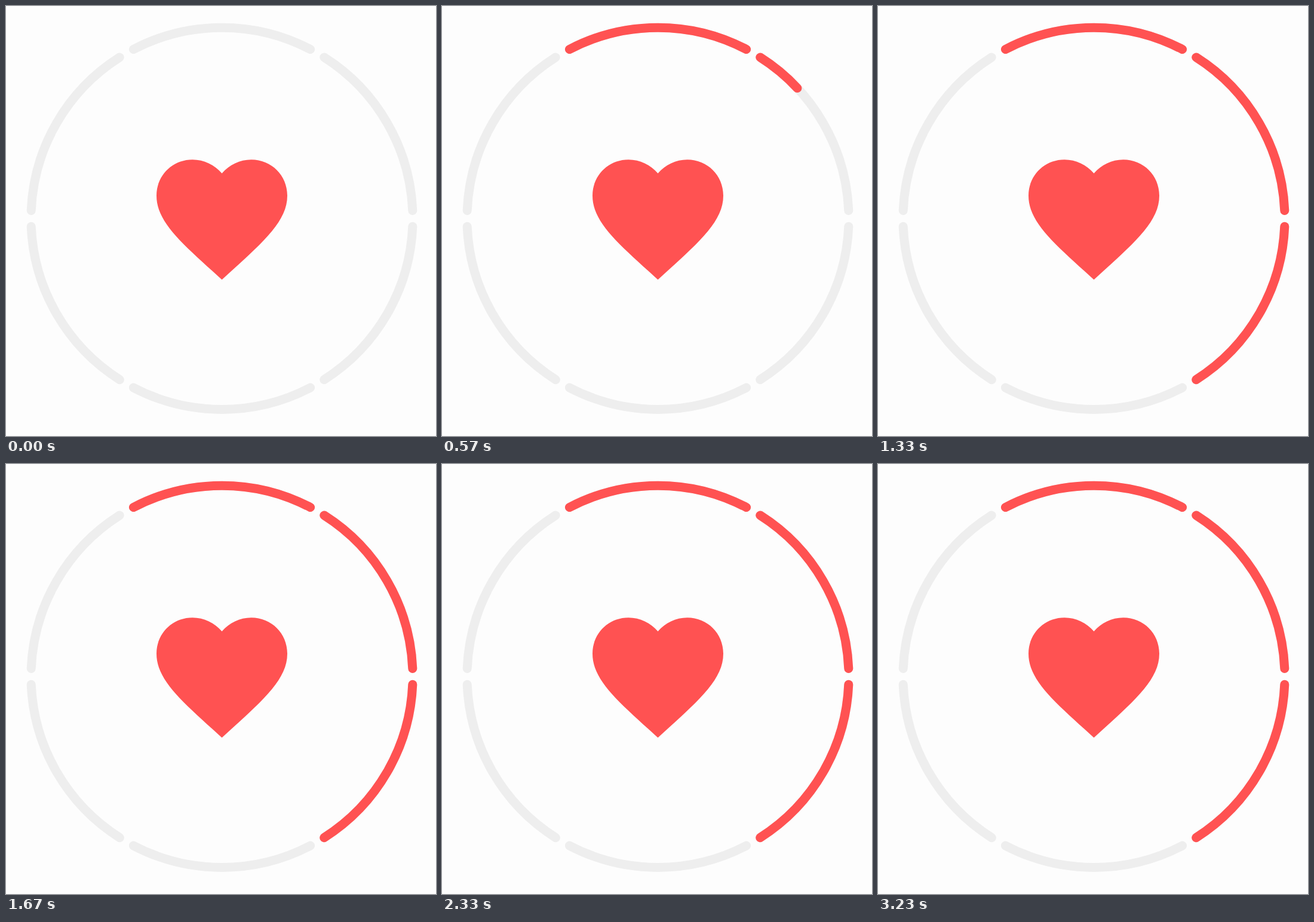
Write an HTML page that moves like this. It is 720 px wide and 720 px high and loops after 3.26 s.

```html
<!DOCTYPE html>
<html lang="en">
<head>
<meta charset="utf-8">
<title>Heart progress ring</title>
<style>
  html, body { margin: 0; width: 100%; height: 100%; overflow: hidden; background: #fdfdfd; }
  svg { display: block; width: 100%; height: 100%; }
  .arc { fill: none; stroke-width: 15; stroke-linecap: round; }
  .track { stroke: #eee; }
  .fill { stroke: #ff5252; }
  .heart { fill: #ff5252; }
</style>
</head>
<body>
<svg viewBox="0 0 720 720">
  <g id="ring"></g>
  <path class="heart" transform="translate(230.1 224.4) scale(10.95)"
    d="M12 21.35l-1.45-1.32C5.4 15.36 2 12.28 2 8.5 2 5.42 4.42 3 7.5 3c1.74 0 3.41.81 4.5 2.09C13.09 3.81 14.76 3 16.5 3 19.58 3 22 5.42 22 8.5c0 3.78-3.4 6.86-8.55 11.54z"/>
</svg>
<script>
const LOOP = 3260;
const CX = 361.5, CY = 355.8, R = 319.6;
const HALF_SPAN = 27.6;
const SEGMENTS = 6, FILLED = 3;
const FIRST = 30, STEP = 430, DURATION = 330;

const ring = document.getElementById('ring');

function point(deg) {
  const a = deg * Math.PI / 180;
  return `${(CX + R * Math.sin(a)).toFixed(2)} ${(CY - R * Math.cos(a)).toFixed(2)}`;
}

function addArc(index, kind) {
  const path = document.createElementNS('http://www.w3.org/2000/svg', 'path');
  const mid = index * 360 / SEGMENTS;
  path.setAttribute('d', `M${point(mid - HALF_SPAN)}A${R} ${R} 0 0 1 ${point(mid + HALF_SPAN)}`);
  path.setAttribute('class', `arc ${kind}`);
  path.setAttribute('pathLength', 1);
  ring.appendChild(path);
  return path;
}

for (let i = 0; i < SEGMENTS; i++) addArc(i, 'track');
const fills = Array.from({ length: FILLED }, (_, i) => addArc(i, 'fill'));

const clamp = x => Math.min(1, Math.max(0, x));
const ease = x => x * x * (3 - 2 * x);

function draw(t) {
  fills.forEach((path, i) => {
    const p = ease(clamp((t - FIRST - i * STEP) / DURATION));
    path.style.display = p > 0 ? '' : 'none';
    path.setAttribute('stroke-dasharray', p < 1 ? `${p} 2` : 'none');
  });
}

const start = performance.now();
function tick() {
  draw((performance.now() - start) % LOOP);
  requestAnimationFrame(tick);
}
tick();
</script>
</body>
</html>
```
